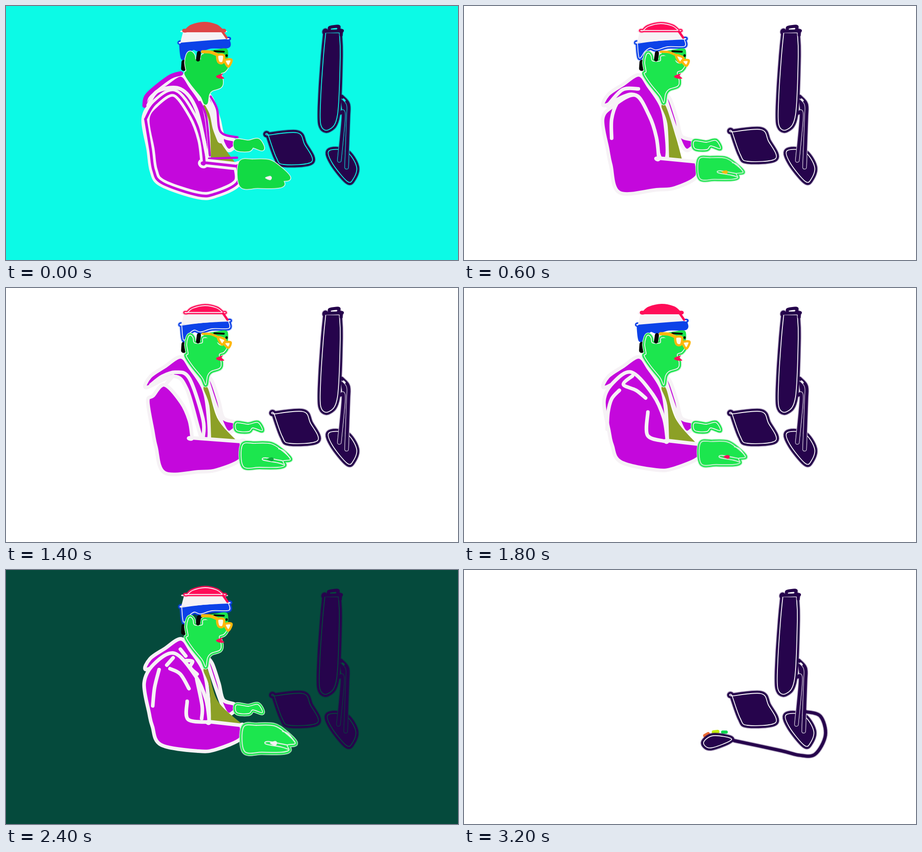
Write an HTML page that moves like this. It is 998 px wide and 561 px high and loops after 3400 ms.

```html
<!DOCTYPE html>
<html lang="en">
<head>
<meta charset="utf-8">
<title>At the computer</title>
<style>
html, body { margin: 0; width: 100%; height: 100%; overflow: hidden; }
#stage {
  display: block; width: 100vw; height: 100vh;
  background: currentColor; color: #fff;
  animation: backdrop 3.4s step-end infinite;
}
#strip { animation: poses 3.4s step-end infinite; }
path { stroke-linecap: round; stroke-linejoin: round; }
@keyframes backdrop {
  0%, 35.29%, 82.35% { color: #0cfae6; }
  11.76%, 58.82% { color: #e61af6; }
  23.52%, 47.05%, 70.58% { color: #054a3c; }
  5.88%, 17.64%, 29.41%, 41.17%, 52.94%, 64.7%, 76.47%, 88.23%, 94.11%, 100% { color: #fff; }
}
@keyframes poses {
  0%, 76.47% { transform: translateX(0); }
  11.76% { transform: translateX(-998px); }
  23.52% { transform: translateX(-1996px); }
  35.29% { transform: translateX(-2994px); }
  52.94% { transform: translateX(-3992px); }
  64.7% { transform: translateX(-4990px); }
  94.11%, 100% { transform: translateX(-5988px); }
}
</style>
</head>
<body>
<svg id="stage" viewBox="0 0 998 561"><g id="strip"></g></svg>
<script>
const GREEN = '#1ce64e', FLAT_GREEN = '#12da44', PURPLE = '#c408dc', OLIVE = '#8ca026', DARK = '#26044c';
const RED = '#ff0c58', BRICK = '#de4646', BLUE = '#0c42e8', GOLD = '#ffb70c';
const WHITE = '#f6f2f5', LENS = '#fffbe8', BLACK = '#060606', BACK = 'currentColor';

// Smooth curve through "x,y x,y ..." points; "!" marks a sharp corner.
function curve(text, closed) {
  const p = text.split(' ').flatMap(s => {
    const point = s.replace('!', '').split(',').map(Number);
    return s.endsWith('!') ? [point, point] : [point];
  });
  const n = p.length;
  const at = i => closed ? p[(i + n) % n] : p[Math.max(0, Math.min(n - 1, i))];
  let d = 'M' + p[0];
  for (let i = 0; i < (closed ? n : n - 1); i++) {
    const [a, b, c, e] = [at(i - 1), at(i), at(i + 1), at(i + 2)];
    const near = [0, 1].map(k => b[k] + (c[k] - a[k]) / 6);
    const far = [0, 1].map(k => c[k] - (e[k] - b[k]) / 6);
    d += `C${near} ${far} ${c}`;
  }
  return d + (closed ? 'Z' : '');
}
const path = (d, fill, stroke, w, alpha = 1) =>
  `<path d="${d}" fill="${fill}" stroke="${stroke}" stroke-width="${w}" opacity="${alpha}"/>`;
const blob = (fill, pts, edge = 'none', w = 0) => path(curve(pts, true), fill, edge, w);
const line = (color, w, ...list) => list.map(pts => path(curve(pts), 'none', color, w)).join('');
const coat = pts => blob(PURPLE, pts, WHITE, 8);
const place = (x, y, body, sx = 1, sy = 1) =>
  `<g transform="translate(${x} ${y}) scale(${sx} ${sy})">${body}</g>`;

// Thick soft outline, flat inside, thin gap between the two.
function neon(color, w, pts, gap = WHITE) {
  const d = curve(pts, true);
  return path(d, 'none', color, w + 3, .3) + path(d, color, color, w) + path(d, 'none', gap, 1.8);
}
// Body part with a pale rim, flat or with an inner gap.
const skin = (pts, flat) => blob(WHITE, pts, WHITE, 11) +
  (flat ? blob(FLAT_GREEN, pts, FLAT_GREEN, 8) : neon(GREEN, 8, pts));
const dark = pts => neon(DARK, 11, pts, BACK);
const soft = pts => path(curve(pts), 'none', DARK, 10, .3) + line(DARK, 7, pts);

function rig(dx, kx = 0, ky = 0) {
  const arm = '741,200 755,217 755,250 751,356', rod = '738,236 744,243 735,341';
  return place(dx, 0,
    dark('712,320 750,321 773,355 765,383 752,387 720,348') +
    line(DARK, 14, '746,210 749,250 743,315') +
    line(BACK, 10, arm, rod) + soft(arm) + soft(rod) + line(BACK, 4, '744,206 747,209') +
    dark('705,59! 735,59! 737,110 731,240 712,273 694,262 694,200 700,110') +
    line(DARK, 7, '704,56! 739,55! 739,64', '713,51 715,47 733,45 733,51') +
    line(BACK, 1.5, '717,51 730,50')) +
    place(kx, ky, dark('592,278! 656,273 672,298 688,337 626,343 610,328'));
}

function mouse() {
  return soft('597,377 700,399 740,409 775,407 798,365 787,323 755,313') +
    line('#ec6c34', 8, '532,366 539,362') + line('#c4f00c', 8, '551,358 560,357') +
    line('#0cd850', 7, '571,358 579,358') + dark('529,381 550,366 591,374 545,393');
}

function cap(dx, red, solid) {
  const dome = '396,54! 407,45 434,39 460,44 473,54!';
  const rim = '383,82! 430,76 486,73! 487,89 450,90 425,97 411,93 400,100 387,115';
  return place(dx, 0,
    (solid ? blob(BLUE, rim, BLUE, 8) : neon(BLUE, 8, rim)) +
    blob(WHITE, '389,57! 478,57! 485,72! 430,76 383,80!', WHITE, 2) +
    (solid ? blob(red, dome, red, 8) : neon(red, 7, dome)) + line(red, 5, '475,57! 484,70'));
}

function head({ flat, bold }) {
  const rims = bold ? ['467,109 481,109 479,125 469,124', '483,120 498,119 491,134']
                    : ['468,109 484,114 477,125', '481,121 496,120 491,132'];
  return skin('398,150 402,145 399,125 402,109 407,104 413,110 416,121 433,121 436,110 461,112 470,124 487,131 481,142 471,147 475,165 472,177 453,184 445,194 441,214 433,198 412,172', flat) +
    blob(flat ? FLAT_GREEN : GREEN, '436,104 465,96 489,96 486,130 465,119') +
    line(BLACK, 9, '426,104 424,118') + line(BLACK, 4, '460,100 481,101') + line(BLACK, 5, '487,109 487,110') +
    line(GOLD, bold ? 7 : 5, '434,101 452,102 467,108') +
    rims.map(p => blob(LENS, p, GOLD, 5)).join('') +
    blob(RED, '464,155 479,149 476,154 482,160 470,160');
}

function hands({ flat, scribble, x = 0, y = 0, sx = 1, sy = 1, ring }) {
  const plain = flat || scribble;
  const near = skin('2,4 30,0 65,1 88,15 108,35 92,39 95,49 80,53 40,53 4,51', plain) +
    (plain ? '' : line(WHITE, 2, '82,12 94,17 107,33', '93,47 80,43 48,37 53,32 92,39')) +
    blob(ring, '56,35 67,31 71,35 67,40');
  return skin('509,298 535,301 556,297 566,315 545,309 536,317 510,315', flat) +
    place(520 + x, 343 + y, near, sx, sy);
}

function chest(tip, crease) {
  return coat('310,220 318,196 350,174 386,152 408,178 436,222 446,275 448,333 432,333 400,225 370,195') +
    coat('445,203 455,206 470,250 480,287 505,297 502,314 482,309') +
    blob(OLIVE, `436,222 446,222 468,290 ${tip},${crease + 5}! 453,${crease}! 449,260`);
}

// Back, shoulder, elbow crease, wrist and hem shape the whole sleeve.
function sleeve({ back, top, crease, wrist, hem, corner, flat }) {
  const [sx, sy] = top, [ex, ey] = crease;
  const along = (u, v) => `${sx + (ex - sx) * u},${sy + (ey - sy) * v}`;
  const pts = `${back},250 ${back + (sx - back) * .32},${sy + 24} ${top} ${along(.6, .33)} ${along(.9, .67)} ` +
    `${crease}! ${wrist},${ey + 8}! ${wrist},${hem - 28} 465,${hem - 4} 425,${hem} ` +
    `${back + 37},${hem + corner} ${back + 18},${hem - 55} ${back + 11},316`;
  return flat ? blob(PURPLE, pts, WHITE, 18) + line(PURPLE, 6, pts + ` ${back},250`) : coat(pts);
}

function person(o) {
  return rig(o.desk, ...(o.keys || [])) + chest(o.tip, o.crease[1]) + (o.under || '') + sleeve(o) +
    line(WHITE, 8, ...o.folds) + line(BLACK, 11, '393,124 392,138') +
    cap(o.cap, o.red || RED, o.solid) + head(o) + hands(o);
}

const shoulderFold = '355,210 369,194';
const poses = [
  person({ desk: 1, keys: [-13, 7], flat: true, bold: true, solid: true, red: BRICK, cap: 3,
    back: 308, top: [372, 192], crease: [438, 346], wrist: 511, hem: 418, corner: -27, tip: 510,
    under: line(PURPLE, 10, '306,220 313,196 360,158 386,149') +
      line(WHITE, 15, '440,205 456,235 464,270 474,296') +
      line(PURPLE, 5, '452,200 466,228 474,278 511,290', '428,212 442,245 450,330', '448,337 510,335'),
    folds: ['314,219 335,188 385,183 420,228 444,332'],
    x: -4, sx: 1, sy: 1.04, ring: WHITE }),
  person({ desk: 1, cap: 0,
    back: 306, top: [378, 197], crease: [430, 336], wrist: 513, hem: 406, corner: 6, tip: 482,
    folds: ['326,292 326,250 338,214 355,200', '316,221 350,185 385,183'],
    x: -3, y: -8, sx: .92, sy: .9, ring: GOLD }),
  person({ desk: 1, cap: 4,
    back: 315, top: [376, 188], crease: [406, 326], wrist: 512, hem: 395, corner: -3, tip: 485,
    folds: ['318,296 334,255 345,208 320,222', shoulderFold, '420,248 434,290 433,325'],
    scribble: true, x: -3, y: -8, sx: .95, sy: .9, ring: '#0cae3e' }),
  person({ desk: 1, cap: 5,
    back: 313, top: [350, 214], crease: [411, 331], wrist: 519, hem: 406, corner: 2, tip: 508,
    folds: ['320,214 345,195 375,186 405,200 435,290 435,332', shoulderFold],
    ring: '#0cae3e' }),
  person({ desk: 1, bold: true, solid: true, cap: 2,
    back: 309, top: [370, 186], crease: [449, 337], wrist: 519, hem: 402, corner: -18, tip: 512,
    folds: ['316,312 318,275 326,245 343,226', '372,194 352,213 380,226 401,243', '406,274 405,325 440,338'],
    y: -4, sx: .94, sy: .96, ring: RED }),
  person({ desk: -1, bold: true, cap: 5,
    back: 305, top: [372, 184], crease: [449, 335], wrist: 519, hem: 400, corner: -14, tip: 521,
    folds: ['324,300 328,260 338,220', shoulderFold, '362,218 385,230 404,262', '421,241 433,300 432,328',
      '400,290 402,330 450,336', '385,175 397,190', '398,200 412,202 407,215 422,230'],
    x: 2, sx: 1.08, sy: 1.12, ring: WHITE }),
  rig(-1) + mouse()
];

document.getElementById('strip').innerHTML = poses.map((pose, i) => place(i * 998, 0, pose)).join('');
</script>
</body>
</html>
```
